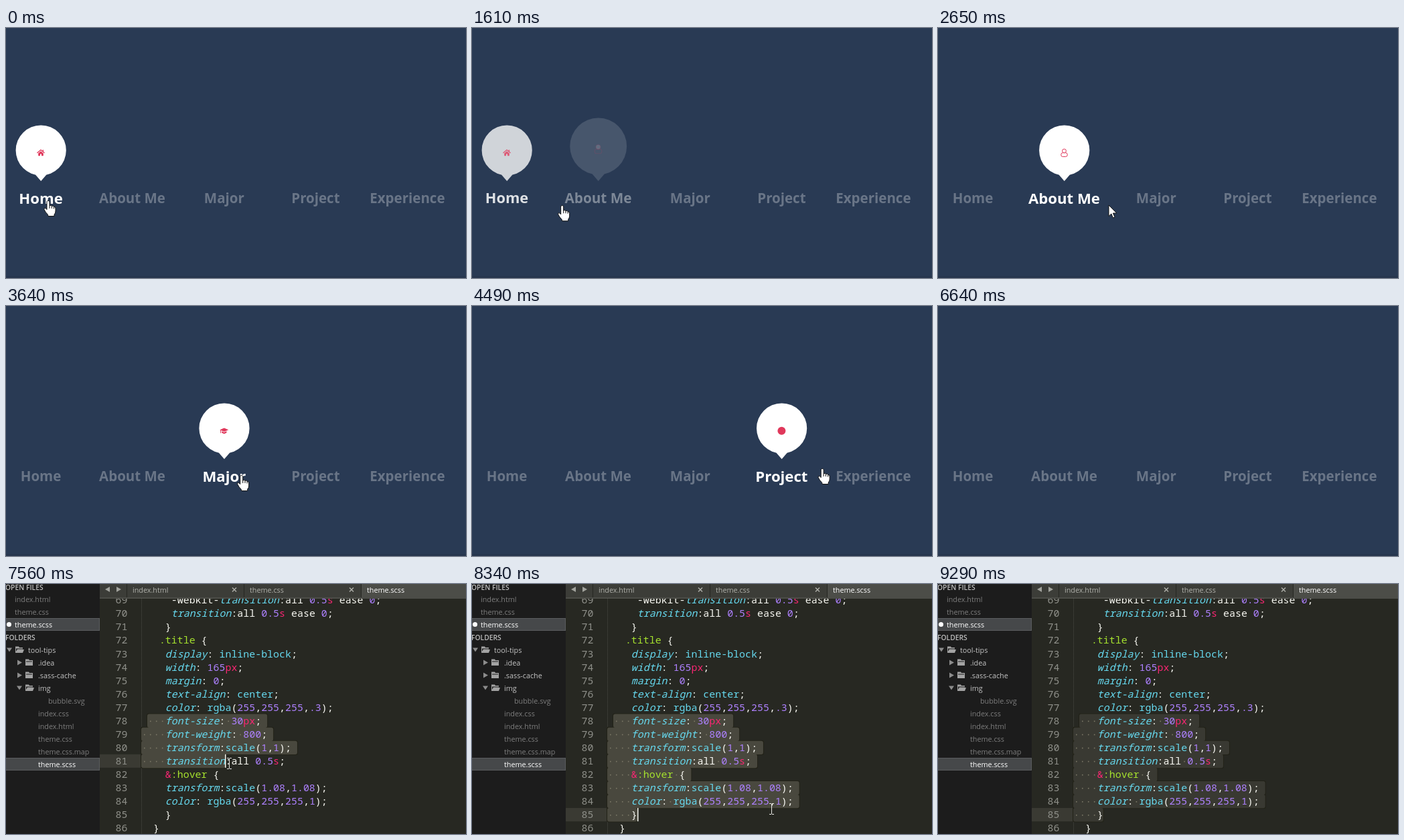
Write an HTML page with a canvas that moves like this. It is 687 px wide and 374 px high and loops after 9.39 s.

```html
<!DOCTYPE html>
<html lang="en">
<head>
<meta charset="utf-8">
<title>Tooltip menu</title>
<style>
html, body { margin: 0; width: 100%; height: 100%; overflow: hidden; background: #293a54; }
canvas { display: block; }
</style>
</head>
<body>
<canvas id="stage" width="687" height="374"></canvas>
<script>
const W = 687, H = 374, LOOP = 9390;
const ctx = document.getElementById('stage').getContext('2d');
const UI = '"Open Sans", "Noto Sans", sans-serif';
const MONO = '"Noto Sans Mono", "DejaVu Sans Mono", monospace';
const RED = '#e0385b';

const BURSTS = [
  [0, 0, 1], [1340, 2190, 7], [2650, 3230, 5], [3640, 4650, 8], [4800, 5230, 4],
  [5540, 6480, 8], [6640, 6640, 1], [7560, 8490, 8], [8610, 8880, 3], [9290, 9290, 1]
];

function captured(t) {
  const [a, b, n] = BURSTS.filter(s => s[0] <= t).pop();
  if (n === 1) return a;
  const gap = (b - a) / (n - 1);
  return a + gap * Math.min(n - 1, Math.floor((t - a) / gap + 0.15));
}

const clamp = (v, lo, hi) => Math.max(lo, Math.min(hi, v));

// CSS "ease"
function ease(x) {
  if (x <= 0) return 0;
  if (x >= 1) return 1;
  const bez = (s, p, q) => 3 * (1 - s) * (1 - s) * s * p + 3 * (1 - s) * s * s * q + s * s * s;
  let lo = 0, hi = 1;
  for (let i = 0; i < 20; i++) {
    const mid = (lo + hi) / 2;
    if (bez(mid, 0.25, 0.25) < x) lo = mid; else hi = mid;
  }
  return bez(lo, 0.1, 1);
}

function along(path, t) {
  let i = 0;
  while (i < path.length - 2 && path[i + 1][0] <= t) i++;
  const [t0, x0, y0] = path[i], [t1, x1, y1] = path[i + 1];
  const k = clamp((t - t0) / (t1 - t0), 0, 1);
  return [x0 + (x1 - x0) * k, y0 + (y1 - y0) * k];
}

function rect(x, y, w, h, color) {
  ctx.fillStyle = color;
  ctx.fillRect(x, y, w, h);
}

function poly(color, ...pts) {
  ctx.fillStyle = color;
  ctx.beginPath();
  for (let i = 0; i < pts.length; i += 2) ctx.lineTo(pts[i], pts[i + 1]);
  ctx.closePath();
  ctx.fill();
}

function dot(x, y, r, color) {
  ctx.fillStyle = color;
  ctx.beginPath();
  ctx.arc(x, y, r, 0, Math.PI * 2);
  ctx.fill();
}

function text(str, x, y, color, font, align = 'left') {
  ctx.font = font;
  ctx.textAlign = align;
  ctx.fillStyle = color;
  ctx.fillText(str, x, y);
}

/* ---------- menu ---------- */

const icons = {
  home() {
    ctx.beginPath();
    ctx.moveTo(-5.5, 0.3);
    ctx.lineTo(0, -4.4);
    ctx.lineTo(5.5, 0.3);
    ctx.lineWidth = 1.3;
    ctx.stroke();
    rect(2.6, -4.4, 1.5, 2.4, RED);
    poly(RED, -3.8, 0.8, 0, -2.4, 3.8, 0.8, 3.8, 4.5, 1, 4.5, 1, 1.8, -1, 1.8, -1, 4.5, -3.8, 4.5);
  },
  user() {
    ctx.beginPath();
    ctx.roundRect(-4.7, 0, 9.4, 5.8, 2.5);
    ctx.stroke();
    ctx.beginPath();
    ctx.arc(0, -2.8, 2.9, 0, Math.PI * 2);
    ctx.fillStyle = '#fff';
    ctx.fill();
    ctx.stroke();
  },
  cap() {
    poly(RED, -6.5, -1.5, 0, -4.2, 6.5, -1.5, 0, 1.2);
    poly(RED, -3.6, 0.6, 0, 2.2, 3.6, 0.6, 3.6, 3, 0, 4.5, -3.6, 3);
    rect(-5.8, -1, 0.9, 4.5, RED);
  },
  disc() { dot(0, 0, 6, RED); },
  card() {
    ctx.beginPath();
    ctx.roundRect(-6.2, -4.8, 12.4, 9.6, 1.2);
    ctx.stroke();
    rect(-6, -2.6, 12, 2.5, RED);
    rect(-4.5, 2.2, 1.8, 1, RED);
    rect(-2, 2.2, 2.6, 1, RED);
  }
};

// label, centre, hover start, hover end, icon
const ITEMS = [
  ['Home', 52, -1000, 1540, 'home'],
  ['About Me', 188.5, 1560, 2655, 'user'],
  ['Major', 325.8, 2680, 3870, 'cap'],
  ['Project', 462.4, 3890, 4600, 'disc'],
  ['Experience', 599.4, 4610, 5740, 'card']
];

const MOUSE = [
  [1200, 63, 258], [1500, 110, 264], [1700, 150, 266], [2190, 215, 265], [2550, 215, 265],
  [2650, 255, 265], [2900, 310, 256], [3230, 335, 254], [3550, 335, 254], [3900, 400, 250],
  [4490, 522, 243], [4650, 534, 243], [4800, 550, 245], [5080, 576, 247], [5230, 585, 246],
  [5450, 585, 246], [5800, 610, 276], [6480, 627, 369], [6640, 627, 378]
];

const HAND = new Path2D('M-2 1.8Q0-1.5 2 1.8L2 8Q4 6.6 5.3 8.4Q7.4 7.4 8.4 9.4Q11 9 11 12L11 16Q11 19 9 21L9 23.5L0 23.5L-.5 21.2Q-4 18-6 13.6Q-6.4 10.6-4 11.6L-2 13.6Z');
const FINGERS = new Path2D('M2 8V12M5.3 8.6V12M8.4 9.6V12.5');
const ARROW = new Path2D('M0 0V16.5L3.8 12.9L6.4 18.9L9 17.8L6.4 12H11.8Z');

function bubble(x, icon, alpha, scale) {
  ctx.save();
  ctx.globalAlpha = alpha;
  ctx.translate(x + 0.2, 229);
  ctx.scale(scale, scale);
  ctx.fillStyle = '#fff';
  ctx.beginPath();
  ctx.arc(0, -46, 37.6, 0, Math.PI * 2);
  ctx.moveTo(-9.5, -11);
  ctx.lineTo(9.5, -11);
  ctx.lineTo(0, 0);
  ctx.fill();
  ctx.translate(-0.2, -42.3);
  ctx.strokeStyle = RED;
  ctx.lineWidth = 1;
  icons[icon]();
  ctx.restore();
}

function item([label, x, on, off, icon], t) {
  const leaving = t >= off;
  const p = leaving ? 1 - ease((t - off) / 500) : ease((t - on) / 500);
  if (p > 0) bubble(x, icon, p, leaving ? 1 : 1.15 - 0.15 * p);
  ctx.save();
  ctx.translate(x, 254.5);
  ctx.scale(1 + 0.08 * p, 1 + 0.08 * p);
  text(label, 0, 7.5, `rgba(255,255,255,${0.3 + 0.7 * p})`, `700 20.5px ${UI}`, 'center');
  ctx.restore();
}

function pointer(t) {
  const [x, y] = along(MOUSE, t);
  const fromEdge = Math.abs((x - 120 + 68.5 + 685) % 137 - 68.5);
  const hand = y < 272 && fromEdge > 3;
  ctx.save();
  ctx.translate(x, y);
  ctx.fillStyle = '#fff';
  ctx.strokeStyle = '#111';
  ctx.lineWidth = 1;
  ctx.fill(hand ? HAND : ARROW);
  ctx.stroke(hand ? HAND : ARROW);
  if (hand) ctx.stroke(FINGERS);
  ctx.restore();
}

function menu(t) {
  rect(0, 0, W, H, '#293a54');
  rect(0, 371, W, 3, '#27364e');
  ITEMS.forEach(it => item(it, t));
  if (t < 6640) pointer(t);
}

/* ---------- editor ---------- */

const FIRST = 69, X0 = 202, ADV = 8.96, ROW = 20.07;
const CODE = [
  '     -webkit-transition:all 0.5s ease 0;',
  '     transition:all 0.5s ease 0;',
  '    }',
  '   .title {',
  '    display: inline-block;',
  '    width: 165px;',
  '    margin: 0;',
  '    text-align: center;',
  '    color: rgba(255,255,255,.3);',
  '    font-size: 30px;',
  '    font-weight: 800;',
  '    transform:scale(1,1);',
  '    transition:all 0.5s;',
  '    &:hover {',
  '    transform:scale(1.08,1.08);',
  '    color: rgba(255,255,255,1);',
  '    }',
  '  }'
];
const TOKEN = /(-webkit-)|([a-z][\w-]*(?=:))|(^\.\w+)|(&)|(:hover)|(\d*\.?\d+)|(px|s\b)|(inline-block|center|rgba|scale)|([^])/g;
const COLORS = ['#f8f8f2', '#66d9ef', '#a6e22e', '#f92672', '#a6e22e', '#ae81ff', '#f92672', '#66d9ef', '#f8f8f2'];
const PROPERTY = 1;

const DRAG = [[7560, 333, 268], [8000, 392, 305], [8490, 468, 347], [8750, 474, 358], [8880, 474, 358]];

const rowTop = n => 34 + (n - 70) * ROW;
const colX = c => X0 + c * ADV;

function codeLine(str, n) {
  const y = rowTop(n) + 15.3;
  const body = str.trimStart(), indent = str.length - body.length;
  text(n, 181.5, y, '#8f908a', `14.93px ${MONO}`, 'right');
  for (const m of body.matchAll(TOKEN)) {
    const kind = m.slice(1).findIndex(g => g !== undefined);
    const style = kind === PROPERTY ? 'italic ' : '';
    text(m[0], colX(indent + m.index), y, COLORS[kind], `${style}14.93px ${MONO}`);
  }
}

function selection(line, col, color) {
  const rows = [];
  for (let n = 78; n <= line; n++) {
    const str = CODE[n - FIRST];
    rows.push({ str, top: rowTop(n), from: n === 78 ? 1 : 0, to: n === line ? col : str.length + 1 });
  }
  const fill = (grow, c) => rows.forEach(({ top, from, to }) => {
    ctx.fillStyle = c;
    ctx.beginPath();
    ctx.roundRect(colX(from) - grow, top - grow, (to - from) * ADV + 2 * grow, ROW + 0.3 + 2 * grow, 3);
    ctx.fill();
  });
  fill(1, '#222218');
  fill(0, color);
  for (const { str, top, from, to } of rows)
    for (let c = from; c < Math.min(to, str.length); c++)
      if (str[c] === ' ') rect(colX(c) + 4, top + 10, 1.6, 1.6, '#7d7a68');
}

function ibeam(x, y) {
  x = Math.round(x);
  y = Math.round(y);
  rect(x, y - 7, 1, 15, '#e8e8e4');
  for (const end of [y - 8, y + 8]) {
    rect(x - 3, end, 3, 1, '#e8e8e4');
    rect(x + 1, end, 3, 1, '#e8e8e4');
  }
}

function triangle(x, y, dir, color) {
  if (dir === 'down') poly(color, x - 4, y - 3, x + 4, y - 3, x, y + 3);
  else {
    const s = dir === 'left' ? -1 : 1;
    poly(color, x - 3 * s, y - 4, x - 3 * s, y + 4, x + 4 * s, y);
  }
}

function folder(x, y, open) {
  const c = '#a3a3a3';
  poly(c, x - 6, y - 5, x - 1, y - 5, x, y - 3.5, x + 5, y - 3.5, x + 5, y + 4.5, x - 6, y + 4.5);
  if (!open) return rect(x - 5, y - 2, 9, 1, '#1c1c1c');
  poly('#1c1c1c', x - 5, y - 2, x + 5, y - 2, x + 5, y - 1, x - 3, y - 1, x - 5, y + 3);
  poly(c, x - 3, y - 0.5, x + 7, y - 0.5, x + 5, y + 4.5, x - 6, y + 4.5);
}

function sidebar() {
  const font = `10.8px ${UI}`;
  const label = (s, x, y, c = '#7d7d7d') => text(s, x, y + 4, c, font);
  rect(0, 0, 140, H, '#1c1c1c');
  for (const y of [51, 260]) {
    rect(0, y, 140, 19, '#5a5c5e');
    rect(0, y + 1, 139, 17, '#46484a');
  }
  text('OPEN FILES', -1, 9, '#bdbdbd', `600 10.3px ${UI}`);
  text('FOLDERS', -1, 84, '#bdbdbd', `600 10.3px ${UI}`);
  label('index.html', 13, 22.5);
  label('theme.css', 13, 41.5);
  label('theme.scss', 13, 60.5, '#fff');
  dot(4.5, 60.5, 3.5, '#fff');
  [['tool-tips', 33, true], ['.idea', 48], ['.sass-cache', 48], ['img', 48, true]].forEach(([s, x, open], i) => {
    const y = 98.5 + i * 19;
    triangle(x - 28, y, open ? 'down' : 'right', '#8c8c8c');
    folder(x - 13, y, open);
    label(s, x, y, '#c4c4c4');
  });
  label('bubble.svg', 63, 174.5);
  ['index.css', 'index.html', 'theme.css', 'theme.css.map', 'theme.scss'].forEach((s, i) =>
    label(s, 48, 193.5 + i * 19, i === 4 ? '#fff' : undefined));
}

function tabs() {
  const active = '#4c4d48';
  rect(140, 0, W - 140, 22, active);
  rect(140, 0, 390, 20, '#3c3d38');
  for (const x of [180, 355, 530]) rect(x, 0, 1, 20, '#262722');
  triangle(152, 8, 'left', '#a2a39d');
  triangle(168, 8, 'right', '#a2a39d');
  ['index.html', 'theme.css', 'theme.scss'].forEach((s, i) =>
    text(s, 189 + i * 175, 12.5, i === 2 ? '#fff' : '#b0b1ab', `10.8px ${UI}`));
  ctx.strokeStyle = '#b0b1ab';
  ctx.lineWidth = 1.4;
  for (const x of [341, 516]) {
    ctx.beginPath();
    ctx.moveTo(x - 3, 5.5);
    ctx.lineTo(x + 3, 11.5);
    ctx.moveTo(x + 3, 5.5);
    ctx.lineTo(x - 3, 11.5);
    ctx.stroke();
  }
}

function editor(t) {
  const [x, y] = along(DRAG, t);
  const line = Math.min(85, 70 + Math.floor((y - 34) / ROW));
  const col = clamp(Math.floor((x - X0) / ADV), 0, CODE[line - FIRST].length);
  rect(140, 0, W - 140, H, '#272822');
  rect(140, rowTop(line), 61, ROW, '#3a3a33');
  for (let g = 22; g < H; g += 2) rect(X0, g, 1, 1, '#4a4b45');
  selection(line, col, t < 9290 ? '#49483e' : '#393932');
  CODE.forEach((s, i) => codeLine(s, FIRST + i));
  if (t < 8880) {
    rect(Math.round(colX(col)), rowTop(line), 1.5, ROW, '#f8f8f0');
    ibeam(x, y);
  }
  tabs();
  sidebar();
}

function frame(now) {
  const t = captured(now % LOOP);
  if (t < 7560) menu(t); else editor(t);
  requestAnimationFrame(frame);
}
requestAnimationFrame(frame);
</script>
</body>
</html>
```
